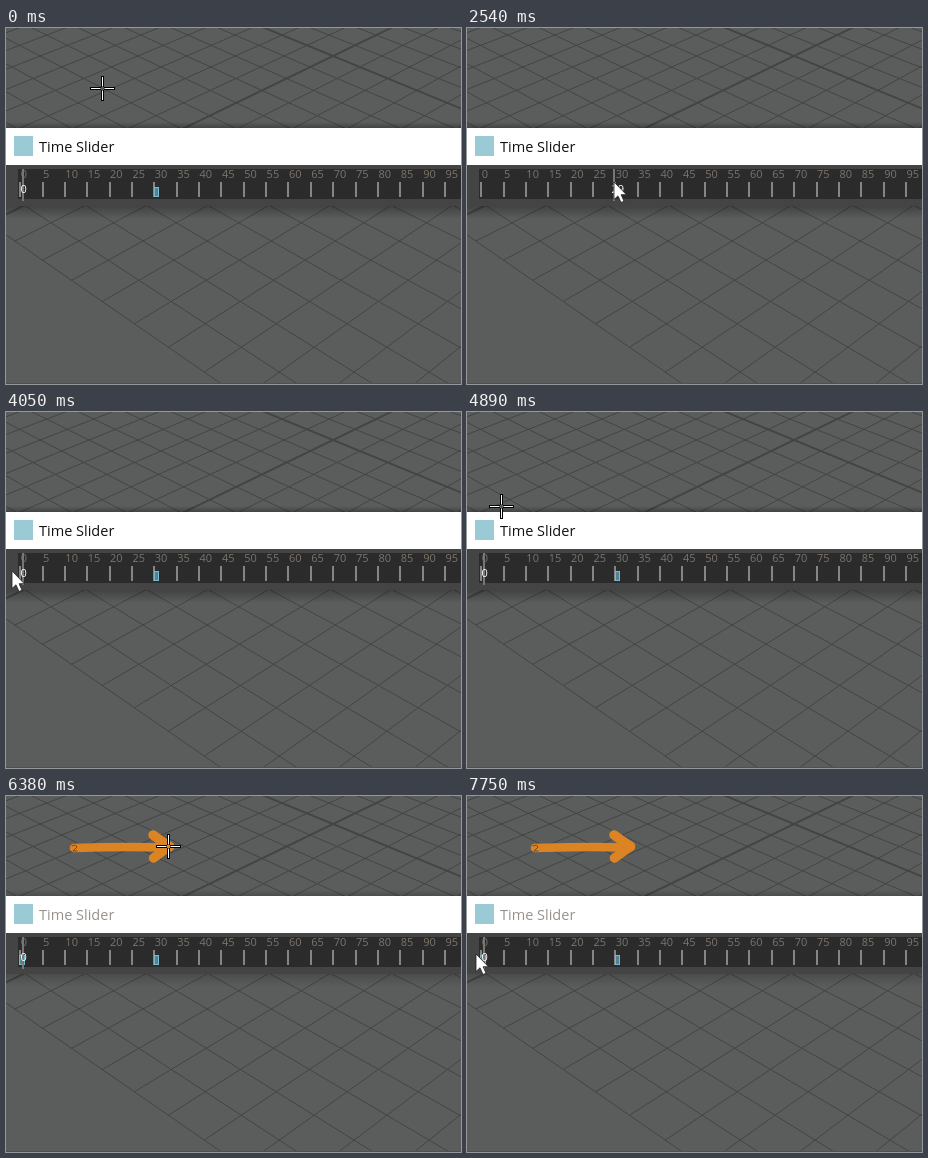
These frames come from a looping animation (455 px wide and 356 px high, 8000 ms). An HTML page:

```html
<!DOCTYPE html>
<html lang="en">
<head>
<meta charset="utf-8">
<title>Time Slider</title>
<style>
html, body { margin: 0; width: 100%; height: 100%; overflow: hidden; background: #5b5d5c; }
svg { display: block; width: 100vw; height: 100vh; }
text { font-family: "Open Sans", "Noto Sans", sans-serif; font-size: 11px; }
</style>
</head>
<body>
<svg viewBox="0 0 455 356">
  <defs>
    <linearGradient id="fade" x1="0" y1="0" x2="0" y2="1">
      <stop offset="0" stop-color="#000" stop-opacity=".28"/>
      <stop offset="1" stop-color="#000" stop-opacity="0"/>
    </linearGradient>
  </defs>
  <rect width="455" height="356" fill="#5b5d5c"/>
  <g id="grid" stroke="#434443"></g>
  <rect y="355" width="455" height="1" fill="#5a4b4e"/>
  <g fill="none" stroke="#dc8424" stroke-width="9.5" stroke-linecap="round" stroke-linejoin="round">
    <path id="shaft" pathLength="1" stroke-width="8.5" d="M68 52 Q112 50.5 162 51.5"/>
    <path id="upper" pathLength="1" d="M147 39 L163.5 50.5"/>
    <path id="lower" pathLength="1" d="M163.5 50.5 L147.5 62"/>
    <path id="curl" stroke="#6f4a20" stroke-width="1" d="M66 50 q4 -2 5 1 l-4 4 h4"/>
    <path id="late" transform="translate(118 68) rotate(-25)" d="M0 0 H96 M82 -12 L98 -1 L82 11"/>
  </g>
  <g id="shadow">
    <rect y="178" width="455" height="13" fill="url(#fade)"/>
    <rect y="-100" width="455" height="6" fill="url(#fade)" transform="scale(1 -1)"/>
  </g>
  <rect y="100" width="455" height="37" fill="#fff"/>
  <rect x="8" y="108" width="19" height="20" fill="#9acbd5"/>
  <text id="title" x="33" y="124" style="font-size:14.5px">Time Slider</text>
  <rect y="137" width="455" height="41" fill="#444"/>
  <rect x="12" y="141" width="443" height="30" fill="#2b2b2b"/>
  <g id="ruler"></g>
  <g fill="#4d8594" stroke="#7db9c8">
    <rect id="key0" x="13.5" y="159.5" width="5" height="9"/>
    <rect x="148.5" y="159.5" width="4" height="9"/>
  </g>
  <g id="now">
    <rect x="16" y="141" width="2" height="32" fill="#777"/>
    <text id="count" x="14.5" y="165" fill="#fff"></text>
  </g>
  <path id="arrow" d="M0 0 V17.5 L4 13.8 L7 20.5 L10 19.2 L7.1 12.7 H12.4 Z" fill="#fff" stroke="#222" stroke-width=".8"/>
  <g id="cross">
    <path d="M-12.5 0 H-1.5 M1.5 0 H12.5 M0 -12.5 V-1.5 M0 1.5 V12.5" stroke="#000" stroke-width="3"/>
    <path d="M-11.5 0 H-2 M2 0 H11.5 M0 -11.5 V-2 M0 2 V11.5" stroke="#fff"/>
  </g>
</svg>
<script>
const LOOP = 8000, STEP = 70, HALF = 12;
const $ = id => document.getElementById(id);
const frameX = f => 14.145 + f * 4.472;

function add(parent, tag, attrs, text = '') {
  const el = document.createElementNS('http://www.w3.org/2000/svg', tag);
  for (const k in attrs) el.setAttribute(k, attrs[k]);
  el.textContent = text;
  $(parent).append(el);
}

// Ground plane: centre plus two vanishing points
function project(u, v) {
  const a = u * 0.01834, b = v * 0.01834, w = 1 + a + b;
  return [(327 - 1113 * a + 1548 * b) / w, (28 - 563 * (a + b)) / w];
}

function gridLine(from, to, width) {
  const [x1, y1] = project(...from), [x2, y2] = project(...to);
  add('grid', 'line', { x1, y1, x2, y2, 'stroke-width': width });
}

for (let i = -HALF; i <= HALF; i++) {
  const width = i ? 1 : 2;
  gridLine([i, -HALF], [i, HALF], width);
  gridLine([-HALF, i], [HALF, i], width);
}

for (let f = 0; f < 100; f += 5) {
  const x = frameX(f);
  add('ruler', 'rect', { x: Math.round(x) - 1, y: 154, width: 2, height: 15, fill: '#858585' });
  add('ruler', 'text', { x: x + 0.5, y: 150, fill: '#7e756c' }, f);
}

// Pointer moves: start, end, x, y
const moves = [
  [920, 1760, 17, 154],   // down to the ruler
  [2100, 2830, 194, 154], // scrub forward
  [3390, 3830, 10, 159],  // and back
  [4050, 4050, 6, 159],
  [4740, 5230, 65, 52],   // up to the scene
  [5580, 5750, 162, 51],  // draw the shaft
  [5750, 5820, 147, 39],
  [5820, 5900, 163, 50],  // draw the head
  [5900, 5990, 148, 62],
  [5990, 5990, 162, 50],
  [6760, 7500, 17, 154],  // back to the ruler
  [7660, 7750, 9, 158]
];

// Eased progress in held steps
function progress(t, start, end, power) {
  if (t < start) return 0;
  const held = (Math.floor((t - start) / STEP) + 1) * STEP;
  return 1 - Math.max(0, 1 - held / (end - start + STEP)) ** power;
}

function pointer(t) {
  let x = 96, y = 60;
  for (const [start, end, toX, toY] of moves) {
    x += (toX - x) * progress(t, start, end, 1.4);
    y += (toY - y) * progress(t, start, end, 2);
  }
  return [x, y];
}

const show = (id, on) => $(id).setAttribute('display', on ? 'inline' : 'none');
const move = (id, x, y) => $(id).setAttribute('transform', `translate(${x} ${y})`);

function ink(id, t, start, end) {
  const k = progress(t, start, end, 1.4);
  show(id, k > 0);
  $(id).setAttribute('stroke-dasharray', k + ' 2');
}

function draw(t) {
  const [x, y] = pointer(t).map(Math.round);
  const overRuler = y >= 100, scrubbing = t >= 2100 && t < 3900, inactive = t >= 5510;
  const frame = scrubbing ? Math.max(0, Math.round((x - 16) / 4.472)) : 0;

  move('arrow', x, y);
  move('cross', x + 0.5, y + 0.5);
  show('arrow', overRuler);
  show('cross', !overRuler);

  move('now', Math.round(frameX(frame) - 14), 0);
  $('count').textContent = frame;
  $('title').setAttribute('fill', inactive ? '#99928c' : '#111');
  $('shadow').setAttribute('opacity', inactive ? 0.6 : 1);

  show('late', frame >= 30);
  ink('shaft', t, 5580, 5750);
  ink('upper', t, 5820, 5900);
  ink('lower', t, 5900, 5990);
  show('curl', t >= 5580);
  show('key0', t >= 6380);
}

function tick() {
  draw(performance.now() % LOOP);
  requestAnimationFrame(tick);
}
tick();
</script>
</body>
</html>
```
